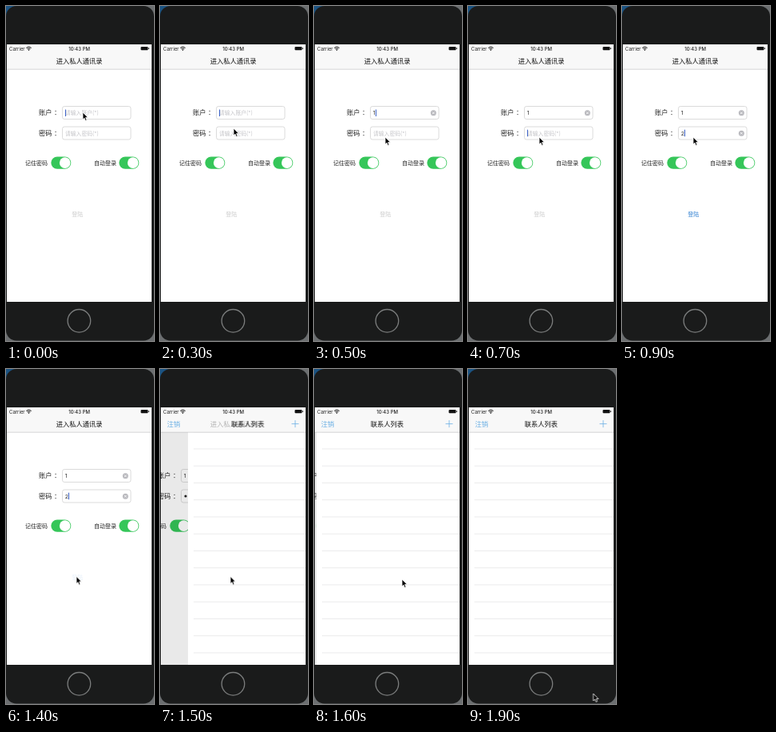
Write an HTML page that moves like this. It is 185 px wide and 419 px high and loops after 2 s.

```html
<!DOCTYPE html>
<html lang="zh-CN">
<head>
<meta charset="utf-8">
<title>通讯录登录</title>
<style>
html, body { margin: 0; width: 100%; height: 100%; overflow: hidden; background: #6b6e70; }
svg { display: block; width: 185px; height: 419px; }
text { font-family: "Noto Sans CJK SC", "Noto Sans CJK", sans-serif; fill: #222; }
.status text { font: 6px Inter, "Liberation Sans", sans-serif; }
.title { font-size: 8.25px; font-weight: 500; fill: #111; }
.label { font-size: 8.2px; }
.option { font-size: 7px; }
.hint { font-size: 6.8px; fill: #c4c4c8; }
.value { font: 6.7px Inter, "Liberation Sans", sans-serif; }
.blue { fill: #6aafe4; }
.field { fill: #fff; stroke: #d2d2d2; stroke-width: .8; }
.caret { fill: #3d63c8; }

/* Every part holds its state until the next key */
.anim { animation: 2s step-end infinite; }
.pointer { animation-name: point; }
.user-hint { animation-name: user-hint; }
.user-value { animation-name: user-value; }
.user-caret { animation-name: user-caret; }
.pass-hint { animation-name: pass-hint; }
.pass-value { animation-name: pass-value; }
.pass-plain { animation-name: pass-plain; }
.pass-mask { animation-name: pushed; }
.pass-caret { animation-name: pass-caret; }
.login { animation-name: login; }
.form { animation-name: form-slide; }
.dim { animation-name: dim; }
.list { animation-name: list-slide; }
.old-title { animation-name: old-title; }
.new-title { animation-name: title-slide; }
.new-items { animation-name: pushed; }

@keyframes point {
  0% { transform: translate(96px, 133px); }
  10% { transform: translate(95px, 139px); }
  15% { transform: translate(92px, 153px); }
  20% { transform: translate(89px, 164px); }
  50% { transform: translate(89px, 176px); }
  55% { transform: translate(89px, 205px); }
  60% { transform: translate(88px, 240px); }
  65% { transform: translate(88px, 259.5px); }
  80% { transform: translate(110px, 263px); }
  85% { transform: translate(130px, 312px); }
  90% { transform: translate(148px, 372px); }
  95%, 100% { transform: translate(156.6px, 406px); }
}
@keyframes user-hint { 0% { opacity: 1; } 20%, 100% { opacity: 0; } }
@keyframes user-value { 0% { opacity: 0; } 20%, 100% { opacity: 1; } }
@keyframes user-caret {
  0% { opacity: 1; transform: none; }
  20% { opacity: 1; transform: translateX(3px); }
  35%, 100% { opacity: 0; }
}
@keyframes pass-hint { 0% { opacity: 1; } 45%, 100% { opacity: 0; } }
@keyframes pass-value { 0% { opacity: 0; } 45%, 100% { opacity: 1; } }
@keyframes pass-plain { 0% { opacity: 0; } 45% { opacity: 1; } 75%, 100% { opacity: 0; } }
@keyframes pass-caret {
  0% { opacity: 0; }
  35% { opacity: 1; transform: none; }
  45% { opacity: 1; transform: translateX(4px); }
  75%, 100% { opacity: 0; }
}
@keyframes login {
  0% { fill: #cbcbcb; opacity: 1; }
  45% { fill: #2f7fd0; opacity: 1; }
  70% { fill: #2f7fd0; opacity: .12; }
  75%, 100% { fill: #2f7fd0; opacity: 1; }
}
@keyframes pushed { 0% { opacity: 0; } 75%, 100% { opacity: 1; } }
@keyframes form-slide {
  0% { transform: none; }
  75% { transform: translateX(-44px); }
  80%, 100% { transform: translateX(-53.2px); }
}
@keyframes dim { 0% { opacity: 0; } 75% { opacity: .085; } 80%, 100% { opacity: .1; } }
@keyframes list-slide {
  0% { transform: translateX(182px); }
  75% { transform: translateX(34px); }
  80% { transform: translateX(2px); }
  85%, 100% { transform: none; }
}
@keyframes old-title { 0% { opacity: 1; } 75% { opacity: .3; } 80%, 100% { opacity: 0; } }
@keyframes title-slide {
  0% { opacity: 0; transform: translateX(91px); }
  75% { opacity: 1; transform: translateX(18.3px); }
  80%, 100% { opacity: 1; transform: none; }
}
</style>
</head>
<body>
<svg viewBox="0 0 185 419">
  <defs>
    <clipPath id="screen"><rect x="1" y="48" width="181" height="322"/></clipPath>
    <g id="clear">
      <circle r="3.5" fill="#b9b9be"/>
      <path d="M-1.4-1.4 1.4 1.4M1.4-1.4-1.4 1.4" stroke="#fff" stroke-width=".8"/>
    </g>
    <g id="switch">
      <rect width="25" height="15.4" rx="7.7" fill="#35c659"/>
      <circle cx="17.4" cy="7.7" r="6.8" fill="#fff"/>
    </g>
    <pattern id="rows" x="0" y="79.2" width="182" height="21.25" patternUnits="userSpaceOnUse">
      <rect x="8" y="20.7" width="174" height=".55" fill="#dadadc"/>
    </pattern>
  </defs>

  <path d="M0 0H12V12H0z" fill="#1b5382"/>
  <rect width="185" height="418.5" rx="13" fill="#1a1b1b"/>
  <circle cx="91.4" cy="393.8" r="14.3" fill="#1a1b1b" stroke="#7b7d7d" stroke-width="1.3"/>

  <g clip-path="url(#screen)">
    <rect x="1" y="48" width="182" height="323" fill="#fff"/>

    <g class="anim form">
      <text class="label" x="41" y="136.2">账户<tspan dx="2.6">：</tspan></text>
      <text class="label" x="41" y="161.7">密码<tspan dx="2.6">：</tspan></text>
      <rect class="field" x="70.5" y="125.5" width="85.5" height="16" rx="2.6"/>
      <rect class="field" x="70.5" y="151" width="85.5" height="16" rx="2.6"/>

      <text class="anim hint user-hint" x="74" y="136.2">请输入账户(*)</text>
      <g class="anim user-value">
        <text class="value" x="73.8" y="136.2">1</text>
        <use href="#clear" x="149.3" y="133.8"/>
      </g>
      <rect class="anim caret user-caret" x="74" y="129.5" width="1" height="8.5"/>

      <text class="anim hint pass-hint" x="74" y="161.7">请输入密码(*)</text>
      <g class="anim pass-value">
        <text class="anim value pass-plain" x="73.8" y="161.6">2</text>
        <circle class="anim pass-mask" cx="76" cy="159" r="1.6" fill="#222"/>
        <use href="#clear" x="149.3" y="159.2"/>
      </g>
      <rect class="anim caret pass-caret" x="74" y="154.7" width="1" height="8.5"/>

      <text class="option" x="24" y="198.8">记住密码</text>
      <use href="#switch" x="56.3" y="188.4"/>
      <text class="option" x="110" y="198.8">自动登录</text>
      <use href="#switch" x="141.3" y="188.4"/>
      <text class="anim option login" x="82.2" y="263.4">登陆</text>
    </g>
    <rect class="anim dim" x="1" y="79" width="182" height="292"/>

    <g class="anim list">
      <rect x="1" y="79" width="183" height="292" fill="#fff"/>
      <rect x="1" y="79.2" width="182" height="291" fill="url(#rows)"/>
    </g>

    <rect x="1" y="48" width="182" height="31" fill="#f8f8f8"/>
    <rect x="1" y="78.8" width="182" height=".6" fill="#b9b9bb"/>
    <text class="anim title old-title" x="91.5" y="71.7" text-anchor="middle">进入私人通讯录</text>
    <text class="anim title new-title" x="91.4" y="71.7" text-anchor="middle">联系人列表</text>
    <g class="anim new-items">
      <text class="blue" x="8.8" y="71.7" font-size="8.25">注销</text>
      <path d="M164.5 68.6h9M169 64.1v9" stroke="#6aafe4" stroke-width=".8"/>
    </g>

    <g class="status">
      <text x="4" y="55.6">Carrier</text>
      <path d="M25.3 52.4q3.2-2.8 6.4 0M26.6 53.8q1.9-1.6 3.8 0" fill="none" stroke="#111"/>
      <circle cx="28.5" cy="55.1" r=".8" fill="#111"/>
      <text x="91.6" y="55.6" text-anchor="middle" style="font-weight:500">10:43 PM</text>
      <rect x="168.5" y="50.9" width="9" height="4.4" rx="1" fill="#111"/>
      <rect x="178" y="52.2" width=".8" height="1.8" fill="#111"/>
    </g>
  </g>

  <g class="anim pointer">
    <path d="M0 0V9l2-1.8 1.4 3.2 1.6-.7-1.4-3.1h2.8z" fill="#000" stroke="#fff" stroke-width=".8"/>
  </g>
</svg>
</body>
</html>
```
